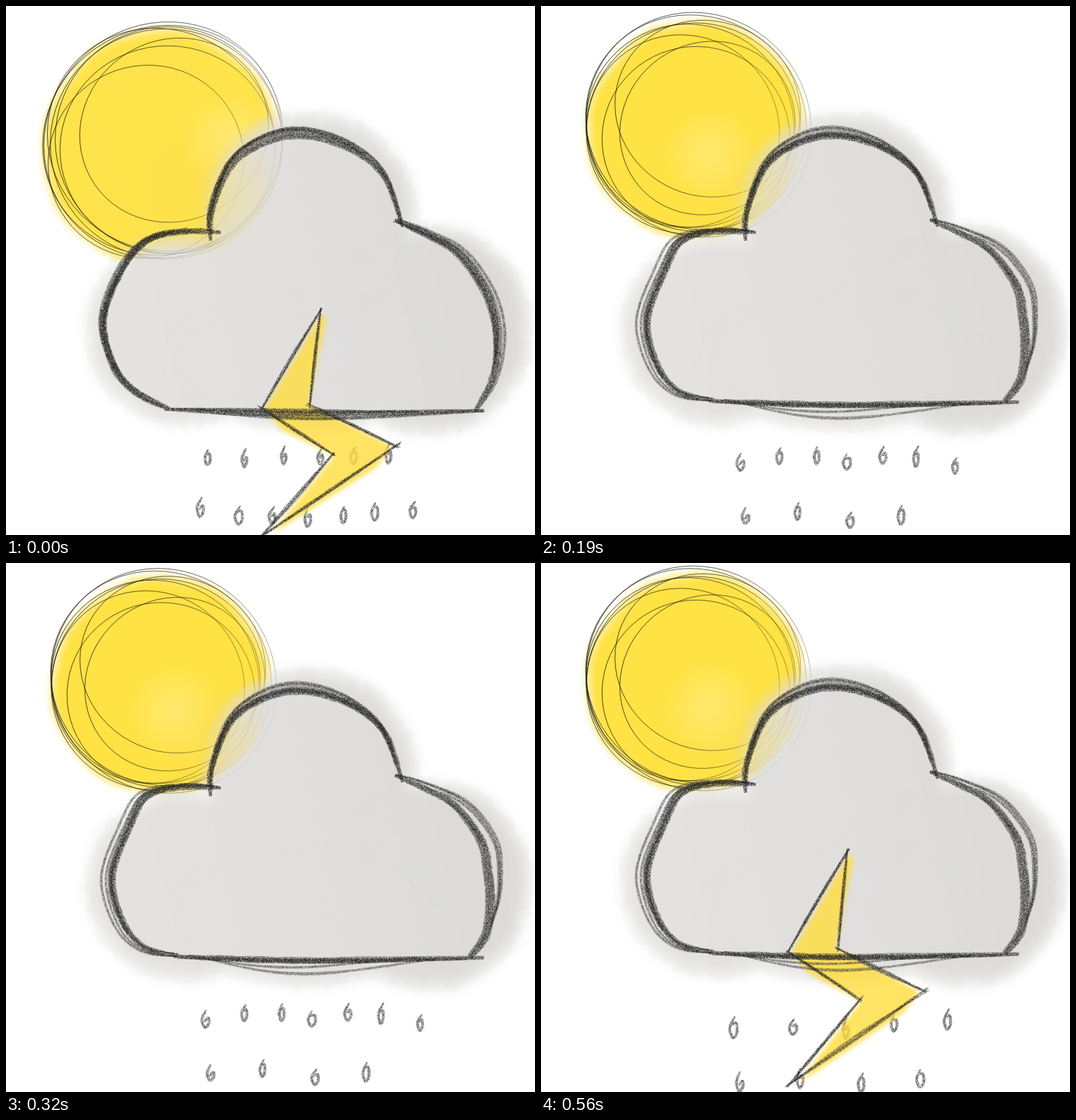
Animation of 748 by 748 pixels, one loop 0.64 s. Source, as an HTML page with a canvas:

```html
<!DOCTYPE html>
<html lang="en">
<head>
<meta charset="utf-8">
<title>Stormy weather</title>
<style>
html, body { margin: 0; width: 100%; height: 100%; overflow: hidden; background: #fff; }
canvas { display: block; width: 748px; height: 748px; }
</style>
</head>
<body>
<canvas id="stage" width="748" height="748"></canvas>
<script>
const SIZE = 748, TAU = Math.PI * 2;
let g, seed = 7;

function rnd() {
  seed = (seed * 16807) % 2147483647;
  return seed / 2147483647;
}
const spread = a => (rnd() * 2 - 1) * a;

function makeCanvas(size) {
  const c = document.createElement('canvas');
  c.width = c.height = size;
  return c;
}

// Charcoal grain used as the paint of every thick line.
function makeGrain() {
  const rough = makeCanvas(256), soft = makeCanvas(256);
  const x = rough.getContext('2d'), y = soft.getContext('2d');
  const img = x.createImageData(256, 256);
  for (let i = 0; i < img.data.length; i += 4) {
    img.data.fill(38, i, i + 3);
    img.data[i + 3] = 50 + 205 * rnd();
  }
  x.putImageData(img, 0, 0);
  y.filter = 'blur(0.7px)';
  y.drawImage(rough, 0, 0);
  return y.createPattern(soft, 'repeat');
}
const grain = makeGrain();

// Catmull-Rom curve through a flat x, y list.
function curve(p) {
  const n = p.length / 2, out = [];
  const at = (i, k) => p[2 * Math.max(0, Math.min(n - 1, i)) + k];
  for (let i = 0; i < n - 1; i++) {
    for (let s = 0; s < 12; s++) {
      const t = s / 12;
      out.push([0, 1].map(k => {
        const a = at(i - 1, k), b = at(i, k), c = at(i + 1, k), d = at(i + 2, k);
        return b + t / 2 * (c - a + t * (2 * a - 5 * b + 4 * c - d + t * (3 * (b - c) + d - a)));
      }));
    }
  }
  out.push([at(n - 1, 0), at(n - 1, 1)]);
  return out;
}

function fillPoly(pts) {
  g.beginPath();
  pts.forEach(p => g.lineTo(p[0], p[1]));
  g.closePath();
  g.fill();
}

function ribbon(c, width) {
  const left = [], right = [], last = c.length - 1;
  c.forEach(([x, y], i) => {
    const a = c[Math.max(0, i - 1)], b = c[Math.min(last, i + 1)];
    const dx = b[0] - a[0], dy = b[1] - a[1], len = Math.hypot(dx, dy) || 1;
    const taper = 0.5 + 0.5 * Math.min(1, i / 8, (last - i) / 8);
    const w = width / 2 * taper * (1 + spread(0.12)) / len;
    left.push([x - dy * w, y + dx * w]);
    right.unshift([x + dy * w, y - dx * w]);
  });
  fillPoly(left.concat(right));
}

function pen(width, dark, c) {
  g.fillStyle = grain;
  g.globalAlpha = dark * 0.75;
  ribbon(c, width);
  g.globalAlpha = dark * 0.65;
  ribbon(c, width * 0.6);
  g.globalAlpha = 1;
}

// One firm line, then lighter ones that swing away from the cloud's middle.
function sketch(path, loose, passes) {
  const c = curve(path);
  for (let k = 0; k < passes; k++) {
    const bow = k < 2 ? spread(2 + 2 * k) : loose * (0.2 + 0.8 * rnd());
    const drift = k ? spread(4) : 0;
    const from = k ? Math.floor(c.length * 0.25 * rnd()) : 0;
    const to = k ? Math.ceil(c.length * (1 - 0.25 * rnd())) : c.length;
    const part = c.slice(from, to).map(([x, y], i, all) => {
      const off = drift + bow * Math.sin(Math.PI * i / (all.length - 1));
      const dx = x - 420, dy = y - 420, len = Math.hypot(dx, dy);
      return [x + dx / len * off, y + dy / len * off];
    });
    if (k < 2) pen(9 - 2 * k, 0.95 - 0.15 * k, part);
    else pen(3 + 2 * rnd(), 0.6, part);
  }
}

function drawCloud({ left, right, base, loose }) {
  sketch([289, 332, 290, 290, 318, 225, 365, 192, 420, 182, 485, 200, 535, 240, 561, 312], loose, 5);
  sketch([304, 320, 250, 319, 200, 332, left + 25, 375, left, 445, left + 15, 510,
    left + 46, 546, left + 92, base - 4], loose, 5);
  sketch([550, 302, 595, 322, 640, 348, 675, 395, right - 3, 440, right, 485,
    right - 8, 530, right - 32, base], loose, 5);
  sketch([left + 85, base - 3, 420, base + 3, 676, base - 1], loose, 4);
}

function blobPath(blobs, inset) {
  g.beginPath();
  blobs.forEach(([x, y, rx, ry = rx]) => {
    for (let i = 0; i <= 90; i++) {
      const a = i / 90 * TAU, k = 1 + 0.01 * Math.sin(3 * a + x) + 0.01 * Math.sin(8 * a + y);
      const px = x + (rx - inset) * k * Math.cos(a), py = y + (ry - inset) * k * Math.sin(a);
      i ? g.lineTo(px, py) : g.moveTo(px, py);
    }
  });
}

// Watercolour: thin rim, solid core, ragged dabs along the edge.
function wash(blobs, paint, inset, blur) {
  g.save();
  g.fillStyle = paint;
  g.filter = `blur(${blur}px)`;
  g.globalAlpha = 0.5;
  blobPath(blobs, inset * 0.3);
  g.fill();
  g.globalAlpha = 0.97;
  blobPath(blobs, inset);
  g.fill();
  g.filter = 'blur(1.5px)';
  g.globalAlpha = 0.14;
  g.beginPath();
  blobs.forEach(([x, y, rx, ry = rx]) => {
    for (let i = 0; i < 110; i++) {
      const a = rnd() * TAU, r = 4 + 8 * rnd(), d = r + inset * 0.5 * rnd();
      const px = x + (rx - d) * Math.cos(a), py = y + (ry - d) * Math.sin(a);
      g.moveTo(px + r, py);
      g.arc(px, py, r, 0, TAU);
    }
  });
  g.fill();
  g.restore();
}

function glow(x, y, r, rgb, a) {
  const s = g.createRadialGradient(x, y, 0, x, y, r);
  s.addColorStop(0, `rgba(${rgb},${a})`);
  s.addColorStop(0.5, `rgba(${rgb},${a * 0.5})`);
  s.addColorStop(1, `rgba(${rgb},0)`);
  g.fillStyle = s;
  g.fillRect(x - r, y - r, 2 * r, 2 * r);
}

// Loose pen circles that share one outer bound and fade to the lower right.
function rings([x, y, r], alpha) {
  g.lineWidth = 0.9;
  g.globalAlpha = alpha;
  for (let i = 0; i < 8; i++) {
    const k = 1 - 0.25 * rnd(), slack = r * (1 - k);
    const cx = x + spread(slack), cy = y + spread(slack);
    const s = g.createLinearGradient(cx - r, cy, cx + r, cy + r * 0.4);
    s.addColorStop(0, 'rgba(25,25,15,.9)');
    s.addColorStop(0.6, 'rgba(25,25,15,.65)');
    s.addColorStop(1, 'rgba(25,25,15,.25)');
    g.strokeStyle = s;
    g.beginPath();
    g.ellipse(cx, cy, r * k, r * k * (0.93 + 0.06 * rnd()), spread(1), 0, TAU);
    g.stroke();
  }
  g.globalAlpha = 1;
}

function cloudWash(lift) {
  const s = g.createLinearGradient(150, 450, 650, 330);
  s.addColorStop(0, '#e2e1df');
  s.addColorStop(0.5, '#dfdedc');
  s.addColorStop(1, '#dad9d7');
  const lobes = [[250, 460, 143], [430, 302, 157], [595, 460, 155], [425, 502, 210, 106]];
  wash(lobes.map(([x, y, ...r]) => [x, y - lift, ...r]), s, 20, 8);
}

function drop(x, y) {
  const r = 11 + 7 * rnd() * rnd(), w = 3 + 2 * rnd(), lean = spread(2), close = rnd();
  pen(4.5, 0.75, curve([
    x + 2 + lean, y - r, x - w, y, x - w * 0.7, y + r * 0.7, x, y + r,
    x + w, y + r * 0.5, x + w * 0.8, y - r * 0.5 * close, x - w * 0.3, y + r * (0.5 - close)
  ]));
}

function rain(rows) {
  rows.forEach(([x, step, count, y]) => {
    for (let i = 0; i < count; i++) drop(x + i * step + spread(5), y + spread(9));
  });
}

// Corners: top, notch, right, foot, inner, left.
function boltShape([x, y, h]) {
  const at = (dx, k) => [x + dx, y + k * h];
  return [at(0, 0), at(-14, 0.415), at(108, 0.6), at(-82, 1), at(18, 0.637), at(-83, 0.43)];
}

function boltWash([top, notch, right, foot, inner, left]) {
  const shift = (p, dx, dy) => [p[0] + dx, p[1] + dy];
  g.save();
  g.fillStyle = '#ffdc3c';
  g.filter = 'blur(3px)';
  g.globalAlpha = 0.8;
  fillPoly([shift(top, 2, 4), shift(top, 9, 8), shift(notch, -2, 0), shift(right, -6, 0),
    shift(right, -28, 30), shift(foot, 36, -16), shift(foot, 14, -4), shift(inner, 2, 2),
    shift(left, 30, 32), shift(left, 4, 2)]);
  g.restore();
}

function boltLines(b) {
  b.forEach((p, i) => {
    const q = b[(i + 1) % b.length];
    for (let k = 0; k < 2; k++) {
      const mix = (t, j) => p[j] + (q[j] - p[j]) * t + spread(1 + 2 * k);
      const line = [-0.03, 0.5, 1.03].flatMap(t => [mix(t, 0), mix(t, 1)]);
      pen(5 - 1.5 * k, 0.85 - 0.3 * k, curve(line));
    }
  });
}

// Round: middle and radius of the pen circles. Rain rows: x, step, count, y.
const poses = {
  a: { seed: 421, left: 139, right: 695, base: 573, loose: 12, yellow: '#ffe348',
    round: [222, 190, 172], shine: [318, 192], rows: [[290, 51, 6, 640], [276, 50, 7, 714]] },
  b: { seed: 88, left: 151, right: 688, base: 561, loose: 20, yellow: '#ffe240',
    round: [223, 168, 163], shine: [240, 212], rows: [[287, 49, 7, 643], [294, 73, 4, 721]] },
  c: { seed: 1907, left: 141, right: 692, base: 577, loose: 24, yellow: '#ffdf32',
    round: [201, 170, 151], shine: [208, 182], rows: [[277, 75, 5, 650], [285, 84, 4, 733]] }
};

// Sun: middle and radius of the yellow wash. Bolt: top corner and height.
const scenes = [
  { ms: 120, pose: poses.a, rain: poses.a, lift: 0, sun: [220, 201, 174], bolt: [444, 432, 317] },
  { ms: 120, pose: poses.b, rain: poses.b, lift: 0, sun: [219, 175, 160] },
  { ms: 80, pose: poses.c, rain: poses.c, lift: 2, sun: [213, 170, 163], bolt: [435, 370, 368] },
  { ms: 120, pose: poses.b, rain: poses.b, lift: 2, sun: [219, 173, 160] },
  { ms: 120, pose: poses.a, rain: poses.a, lift: 4, sun: [222, 187, 176] },
  { ms: 80, pose: poses.b, rain: poses.c, lift: 7, sun: [219, 169, 160], bolt: [433, 408, 329] }
];

function paint({ pose, rain: wet, lift, sun, bolt }) {
  const c = makeCanvas(SIZE), [sx, sy] = pose.shine;
  const ringSet = alpha => {
    seed = pose.seed;
    rings([pose.round[0], pose.round[1] - lift * 0.7, pose.round[2]], alpha);
  };
  g = c.getContext('2d');
  g.fillStyle = '#fff';
  g.fillRect(0, 0, SIZE, SIZE);

  wash([sun], pose.yellow, 13, 5);
  glow(sx, sy - lift, 70, '255,238,140', 0.65);
  ringSet(0.9);
  cloudWash(lift + 2);
  g.save();
  blobPath([sun], 8);
  g.clip();
  glow(290, 262 - lift, 100, '250,222,85', 0.45);
  g.restore();
  ringSet(0.2);

  seed = wet.seed;
  rain(wet.rows);
  const corners = bolt && boltShape(bolt);
  if (bolt) boltWash(corners);
  seed = pose.seed;
  g.save();
  g.translate(0, -lift);
  drawCloud(pose);
  g.restore();
  if (bolt) boltLines(corners);
  return c;
}

const views = scenes.map(paint);
const loop = scenes.reduce((sum, s) => sum + s.ms, 0);
const out = document.getElementById('stage').getContext('2d');

function tick() {
  let t = performance.now() % loop, i = 0;
  while (t >= scenes[i].ms) t -= scenes[i++].ms;
  out.drawImage(views[i], 0, 0);
  requestAnimationFrame(tick);
}
tick();
</script>
</body>
</html>
```
